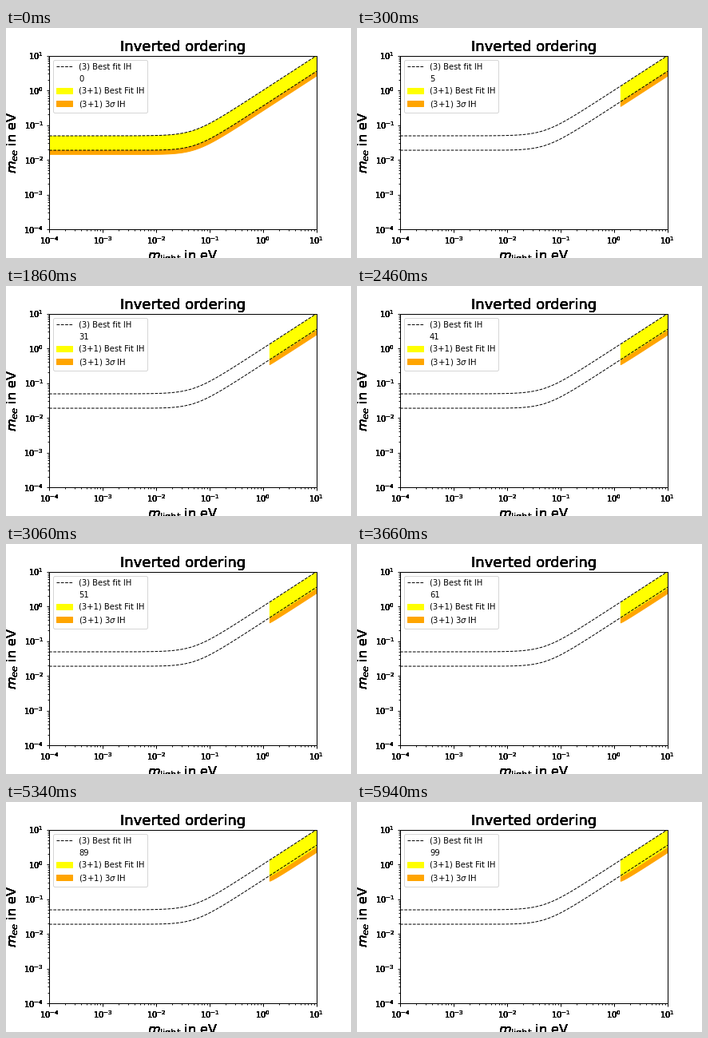
Recreate the animation shown at these times as a matplotlib script. Size 432 by 288 pixels, loop 6 s.

```python
import numpy as np
import matplotlib.pyplot as plt
from matplotlib.animation import FuncAnimation

FRAMES = 100
INTERVAL = 60
S14_MAX = 0.036      # active-sterile mixing reached at the end of the loop
DM_ATM = 2.5e-3      # squared mass splittings in eV^2
DM_STERILE = 1.7

plt.rcParams["font.family"] = "DejaVu Sans"


def bounds(m, cos2_12, s13, s14=0.0):
    """Largest and smallest effective mass for inverted ordering."""
    heavy = (1 - s13) * np.sqrt(m**2 + DM_ATM)
    m4 = np.sqrt(np.maximum(m**2 - DM_STERILE, 0))
    high = (1 - s14) * (heavy + s13 * m) + s14 * m4
    low = (1 - s14) * (cos2_12 * heavy - s13 * m) - s14 * m4
    return low, high


def outline(x, low, high):
    """Closed polygon between two curves."""
    return np.column_stack([np.r_[x, x[::-1]], np.r_[low, high[::-1]]])


def harden(text, copies=6):
    """Stack copies of a text so that its soft edges turn solid."""
    pixel = text.get_transform().transform(text.get_position())
    x, y = fig.transFigure.inverted().transform(pixel)
    for _ in range(copies):
        fig.text(x, y, text.get_text(), fontsize=text.get_fontsize(),
                 ha=text.get_ha(), va=text.get_va(),
                 rotation=text.get_rotation(),
                 rotation_mode=text.get_rotation_mode())


fig, ax = plt.subplots(figsize=(6, 4), dpi=72)
fig.subplots_adjust(left=0.125, right=0.9, bottom=0.125, top=0.88)
ax.set(xscale="log", yscale="log", xlim=(1e-4, 10), ylim=(1e-4, 10))
ax.set_title("Inverted ordering", fontsize=18)
ax.set_xlabel(r"$m_{\mathrm{light}}$ in eV", fontsize=16)
ax.set_ylabel(r"$m_{ee}$ in eV", fontsize=16)
ax.tick_params(which="major", width=1)
ax.tick_params(which="minor", width=0.9)
for spine in ax.spines.values():
    spine.set_linewidth(1)

mass = np.logspace(-4, 1, 1000)
allowed = mass[mass**2 >= DM_STERILE]
BEST = dict(cos2_12=0.385, s13=0.022)
WIDE = dict(cos2_12=0.30, s13=0.024)

low, high = bounds(mass, **BEST)
ax.plot(mass, high, "k--", lw=1, label="(3) Best fit IH")
ax.plot(mass, low, "k--", lw=1)
ax.plot([], [], ls="none", label="0")
yellow = ax.fill_between(mass, low, high, color="yellow",
                         label="(3+1) Best Fit IH")
orange = ax.fill_between(mass, bounds(mass, **WIDE)[0], low, color="orange",
                         label=r"(3+1) 3$\sigma$ IH")
counter = ax.legend(loc="upper left", fontsize=10).get_texts()[1]

fig.canvas.draw()
for label in [ax.title, ax.xaxis.label, ax.yaxis.label,
              *ax.get_xticklabels(), *ax.get_yticklabels()]:
    if label.get_text():
        harden(label)


def update(step):
    # Without mixing the sterile state sets no lower limit on the mass.
    x = allowed if step else mass
    s14 = S14_MAX * step / (FRAMES - 1)
    low, high = bounds(x, s14=s14, **BEST)
    floor, _ = bounds(x, s14=s14, **WIDE)
    yellow.set_verts([outline(x, low, high)])
    orange.set_verts([outline(x, floor, low)])
    counter.set_text(str(step))
    return yellow, orange, counter


anim = FuncAnimation(fig, update, frames=FRAMES, interval=INTERVAL,
                     repeat=True, repeat_delay=0, blit=False)
plt.show()
```
